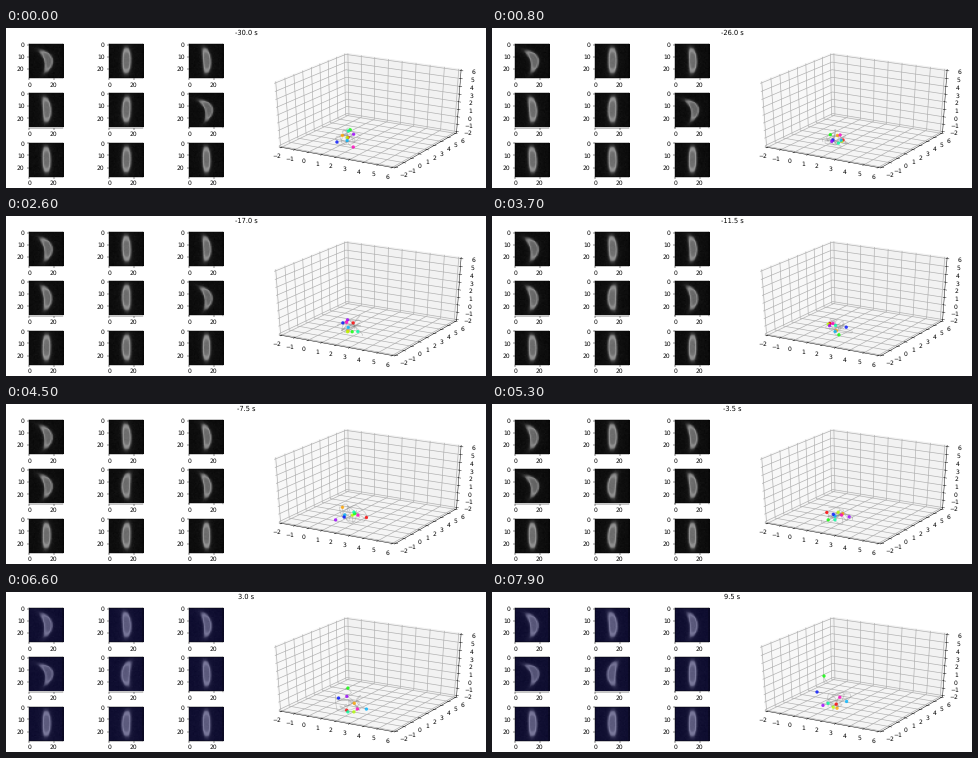
Recreate the animation shown at these times as a matplotlib script. Size 480 by 160 pixels, loop 8 s.

```python
import numpy as np
import matplotlib.pyplot as plt
from matplotlib.animation import FuncAnimation
from matplotlib.collections import LineCollection

W, H, DPI = 480, 160, 40
FRAMES, STEP, TAIL = 80, 100, 8
N, CELLS = 28, 9

# Curl of each cell at the start and end of the loop
CURL_START = np.array([.8, 0, .15, .2, 0, 1, .05, 0, 0])
CURL_END = np.array([.6, .2, .5, 1.1, -.4, 0, .05, -.1, .05])

CENTER, SPREAD = (345, 110), (7, 4.5)
LEAVING = {3: (332, 84), 6: (325, 100)}  # markers that drift out late
COLORS = plt.cm.hsv(np.arange(CELLS) / CELLS)

plt.rcParams.update({
    "text.hinting": "none",
    "grid.linewidth": 1.2,
    "xtick.labelsize": 10.8,
    "ytick.labelsize": 10.8,
})


def ease(t):
    t = np.clip(t, 0, 1)
    return t * t * (3 - 2 * t)


def build_tracks():
    """Smooth seeded wander around the centre, with a late drift for some."""
    rng = np.random.default_rng(12)
    steps = np.arange(-TAIL, FRAMES)
    kernel = np.hanning(9)[1:-1]
    kernel /= np.sqrt((kernel ** 2).sum())
    tracks = np.empty((CELLS, len(steps), 2))
    for k in range(CELLS):
        for d in range(2):
            noise = rng.normal(size=len(steps) + len(kernel) - 1)
            wander = np.convolve(noise, kernel, "valid")
            tracks[k, :, d] = CENTER[d] + SPREAD[d] * np.clip(wander, -2.2, 2.2)
    leave = ease((steps - 50) / (FRAMES - 51))[:, None]
    for k, goal in LEAVING.items():
        tracks[k] += (np.array(goal) - tracks[k]) * leave
    return tracks


def cell_image(k, i):
    """Soft, bright-rimmed rod on a dark, slightly noisy ground."""
    rng = np.random.default_rng(1000 * k + i)
    curl = CURL_START[k] + (CURL_END[k] - CURL_START[k]) * ease(i / (FRAMES - 1))
    curl += .05 * np.sin(i * .9 + k)
    c = abs(curl)
    tilt = -.3 * curl + .03 * np.sin(i * .6 + 2 * k)
    y, x = np.mgrid[:N, :N] - 13.5
    u = y * np.cos(tilt) - x * np.sin(tilt)
    v = x * np.cos(tilt) + y * np.sin(tilt)
    v = v + curl * (.065 * u ** 2 - 2)

    length, width = 10.7 - 2 * c, 3.5 + .2 * np.sin(k * 2.1)
    r = (np.abs(u / length) ** 2.4 + np.abs(v / width) ** 2.4) ** (1 / 2.4)
    body = 1 / (1 + np.exp((r - 1) / .09))
    rim = np.exp(-((r - .82) / .2) ** 2)
    halo = .07 * np.exp(-np.maximum(r - .9, 0) * 2)
    g = .05 + halo + body * (.31 + .2 * rim) * (1 - .12 * c)
    g = g + rng.normal(0, .008, g.shape)
    rgb = np.repeat(g[..., None], 3, axis=2)
    if i >= FRAMES * 3 // 4:
        rgb = rgb * .8 + (.02, .015, .15)
    return np.clip(rgb, 0, 1)


def box(x, y, w, h):
    return [x / W, 1 - (y + h) / H, w / W, h / H]


fig = plt.figure(figsize=(W / DPI, H / DPI), dpi=DPI, facecolor="white")
title = fig.text(.5, 1 - 1.7 / H, "", fontsize=12, ha="center", va="top")

images = []
for k in range(CELLS):
    row, col = divmod(k, 3)
    ax = fig.add_axes(box(22.5 + 80 * col, 16 + 49.3 * row, 34.2, 34.2))
    images.append(ax.imshow(cell_image(k, 0)))
    ax.set_xticks([0, 20])
    ax.set_yticks([0, 10, 20])

space = fig.add_axes(box(241.7, 16.5, 236.7, 131.5), projection="3d")
space.apply_aspect = lambda position=None: None  # fill the wide slot
space.set_box_aspect((1, 1, 1), zoom=.9467)
space.view_init(30, -60)
space.patch.set_visible(False)
lim = (-2 - 1 / 6, 6 + 1 / 6)
space.set(xlim=lim, ylim=lim, zlim=lim)
for axis in (space.xaxis, space.yaxis, space.zaxis):
    axis.set_ticks(range(-2, 7))

stage = fig.add_axes([0, 0, 1, 1])
stage.set(xlim=(0, W), ylim=(H, 0))
stage.axis("off")
tracks = build_tracks()
tails = LineCollection([], colors="gray", linewidths=1.5, alpha=.35)
stage.add_collection(tails, autolim=False)
dots = stage.scatter(*tracks[:, TAIL].T, s=36, c=COLORS, alpha=.8,
                     linewidths=0, zorder=3)


def update(i):
    title.set_text(f"{-30 + i / 2:.1f} s")
    for k, im in enumerate(images):
        im.set_data(cell_image(k, i))
    tails.set_segments(list(tracks[:, i:i + TAIL + 1]))
    dots.set_offsets(tracks[:, i + TAIL])
    return [title, tails, dots, *images]


anim = FuncAnimation(fig, update, frames=FRAMES, interval=STEP, repeat=True,
                     repeat_delay=0)
plt.show()
```
